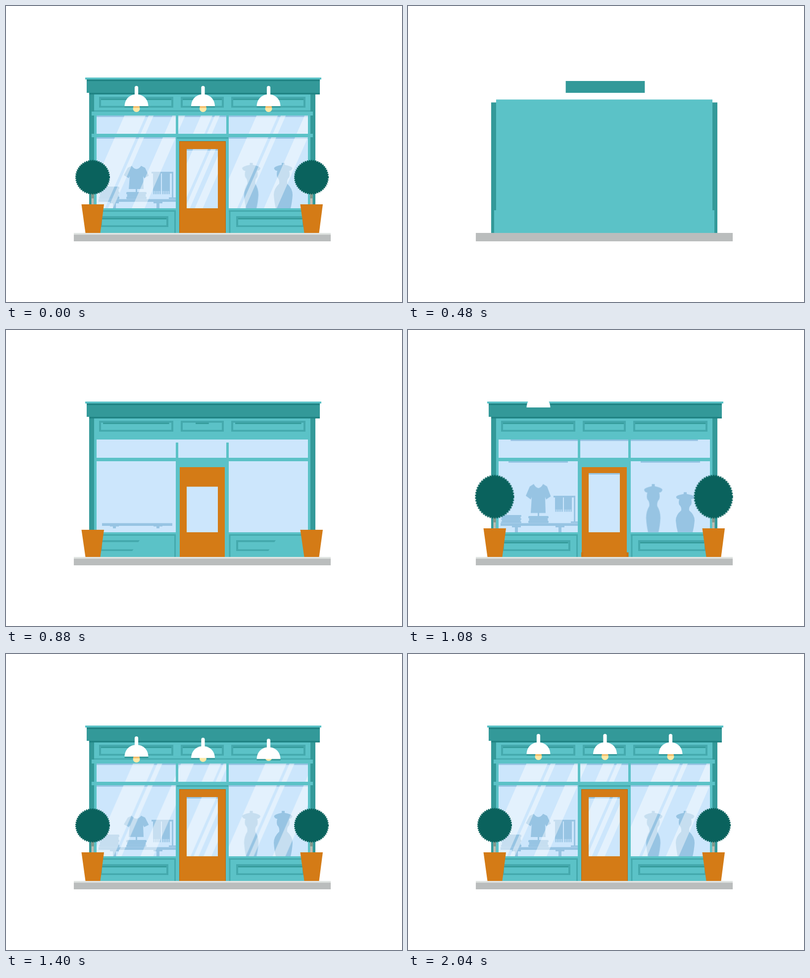
These frames come from a looping animation (800 px wide and 600 px high, 2920 ms). An HTML page:

```html
<!DOCTYPE html>
<html lang="en">
<head>
<meta charset="utf-8">
<title>Shop front</title>
<style>
html, body { margin: 0; width: 100%; height: 100%; overflow: hidden; background: #fff; }
svg { display: block; width: 100%; height: 100%; }
svg * { transform-box: fill-box; transform-origin: 50% 100%; }
@keyframes show { from { visibility: hidden; } }
@keyframes growX { from { transform: scaleX(0); } }
@keyframes growY { from { transform: scaleY(0); } }
@keyframes growBack {
  0% { transform: scaleY(0); }
  45% { transform: scaleY(1.2); }
  75% { transform: scaleY(.95); }
}
@keyframes pane {
  0% { transform: scaleY(0); }
  55% { transform: scaleY(1.11); }
}
@keyframes spring {
  0% { transform: scaleY(0); }
  15% { transform: scaleY(1.25); }
  32% { transform: scaleY(.87); }
  55% { transform: scaleY(.92); }
  78% { transform: scaleY(1.01); }
}
@keyframes bush {
  0% { transform: scale(0); }
  10% { transform: scale(1.2, 1); }
  15% { transform: scale(1.13, 1.265); }
  30% { transform: scale(.94, .95); }
  43% { transform: scale(1.03, 1.04); }
  55% { transform: scale(1, .985); }
  75% { transform: scale(1.01, 1); }
}
@keyframes wipe {
  from { clip-path: polygon(0 0, 0 0, -15px 100%, 0 100%); }
  to { clip-path: polygon(0 0, 170px 0, 155px 100%, 0 100%); }
}
@keyframes drop {
  0% { transform: translateY(-150px); }
  12.5% { transform: translateY(-46px); }
  25% { transform: translateY(2px); }
  35% { transform: translateY(12px); }
  45% { transform: translateY(9px); }
  50% { transform: translateY(6.5px); }
  55% { transform: translateY(3.5px); }
  70% { transform: translateY(-2.6px); }
  85% { transform: translateY(-1px); }
}
@keyframes tuck { from { transform: translateY(-13px); } }
@keyframes slide { from { transform: translateX(230px); } }
</style>
</head>
<body>
<svg id="stage" viewBox="0 0 800 600"></svg>
<script>
const LIGHT = '#5bc2c7', MID = '#44a9ad', TEAL = '#339999', DARK = '#1f8383',
      GLASS = '#cce6fc', BLUE = '#97c4e3', ORANGE = '#d47b16', LEAF = '#0a625d';
const OUT = 'cubic-bezier(.215,.61,.355,1)';

// Style attribute for one entrance animation
const anim = (name, start, dur, ease = 'linear', origin = '') =>
  ` style="animation:${name} ${dur}ms ${ease} ${start}ms both paused;${origin && 'transform-origin:' + origin}"`;
const path = (d, fill, a = '') => `<path d="${d}" fill="${fill}"${a}/>`;
const box = (x0, y0, x1, y1, fill, a = '', r = 0) =>
  `<rect x="${x0}" y="${y0}" width="${x1 - x0}" height="${y1 - y0}" rx="${r}" fill="${fill}"${a}/>`;
const group = (inner, a = '') => `<g${a}>${inner}</g>`;
const wide = (start, dur) => anim('growX', start, dur, OUT);

function panel(x0, y0, x1, y1, start) {
  const ring = `M${x0} ${y0}H${x1}V${y1}H${x0}ZM${x0 + 4} ${y0 + 4}V${y1 - 3.5}H${x1 - 4}V${y0 + 4}Z`;
  return box(x0 + 4, y0 + 3.5, x1 - 4, y0 + 6.5, TEAL, wide(start + 140, 160)) +
    path(ring, MID, anim('wipe', start, 170));
}

function pile(x, top, n, a) {
  const h = (391 - top) / n;
  let s = '';
  for (let i = 0; i < n; i++) {
    const dx = i % 2 ? 1.5 : 0;
    s += box(x + dx, top + i * h, x + 41 - dx, top + (i + 1) * h + .4, BLUE, '', 2);
  }
  return group(s, a);
}

function towel(x) {
  return box(x, 336, x + 16, 375, BLUE) +
    `<path d="M${x + .5} 378H${x + 16}" stroke="${BLUE}" stroke-width="7" stroke-dasharray="2 1.3"/>`;
}

function mannequin(x, hip, start) {
  const d = `M-3 318H3V322Q18 325 18.5 329Q17 334 12 334Q14 342 12 347Q7 352 8 360
    Q${hip} 370 ${hip} 383Q${hip - 1} 398 ${hip - 4} 410H${4 - hip}Q${1 - hip} 398 ${-hip} 383
    Q${-hip} 370 -8 360Q-7 352 -12 347Q-14 342 -12 334Q-17 334 -18.5 329Q-18 325 -3 322Z`;
  return `<g transform="translate(${x})">${path(d, BLUE, anim('growBack', start, 340, 'ease-out'))}</g>`;
}

// Slanted reflections; each band is [left, right] measured at height y
function glare(id, panes, y, bands) {
  const lean = .4375;
  const d = bands.map(([l, r]) => {
    const up = (y - 200) * lean, down = (420 - y) * lean;
    return `M${l + up} 200H${r + up}L${r - down} 420H${l - down}Z`;
  }).join('');
  return `<clipPath id="${id}">${panes.map(p => box(...p, '#000')).join('')}</clipPath>` +
    `<g clip-path="url(#${id})">${path(d, '#fff" fill-opacity=".45', anim('slide', 1120, 475, OUT))}</g>`;
}

function tree(x) {
  return box(x - 2.5, 376, x + 2.5, 403, '#bfbdb2', anim('growY', 900, 100)) +
    box(x - 2.5, 376, x + 2.5, 390, '#83968a', anim('growY', 940, 80)) +
    path(`M${x - 22.5} 402H${x + 23}L${x + 15.5} 460H${x - 14.5}Z`, ORANGE, anim('growBack', 820, 220, 'ease-out')) +
    group(`<circle cx="${x}" cy="347" r="33.6" fill="${LEAF}"/>
      <circle cx="${x}" cy="347" r="34" fill="none" stroke="${LEAF}" stroke-width="2" stroke-dasharray="2.6 1.7"/>`,
      anim('bush', 960, 800));
}

function lamp(x, i) {
  const late = i * 40;
  const bulb = `<circle cx="${x}" cy="208" r="7" fill="#fce9a6"/>` +
    path(`M${x - 6} 203H${x + 6}L${x + 6.8} 206.5H${x - 6.8}Z`, '#f3bd6c');
  return group(
    box(x - 24, 203, x + 24, 206, TEAL, anim('show', 1240 + late, 1)) +
    group(group(bulb, anim('tuck', 1270 + late, 130)), anim('show', 1200 + late, 1)) +
    box(x - 3.6, 162, x + 3.6, 190, '#fff', '', 3.5) +
    path(`M${x - 24} 203C${x - 23} 171 ${x + 23} 171 ${x + 24} 203Z`, '#fff'),
    anim('drop', 980 + late, 800));
}

const rise = anim('growY', 280, 280, 'cubic-bezier(.3,.32,.3,1)');
const pillar = anim('growY', 287, 290, 'cubic-bezier(.3,.32,.3,1)');
const art = [
  box(137, 460, 656, 477, '#babdbd', anim('show', 300, 1)),
  box(137, 460, 656, 463.5, '#e0e4e2', anim('growX', 500, 240, 'ease-in-out')),
  // walls
  box(168, 176, 178, 460, TEAL, pillar),
  box(615, 176, 625, 460, TEAL, pillar),
  box(178, 176, 615, 460, LIGHT, rise),
  ...[[174, 343], [448, 619]].map(([l, r]) => box(l, 414, r, 460, LIGHT, anim('growY', 280, 40))),
  box(171, 410, 343, 414, LIGHT, wide(520, 120)),
  box(450, 410, 622, 414, LIGHT, wide(520, 120)),
  box(174, 414, 343, 417, MID, wide(760, 160)),
  box(450, 414, 619, 417, MID, wide(760, 160)),
  box(340, 414, 343, 460, MID, anim('growBack', 560, 266, 'ease-out')),
  box(450.5, 414, 453.5, 460, MID, anim('growBack', 560, 266, 'ease-out')),
  panel(190, 426, 328, 448, 800),
  panel(465, 426, 603, 448, 800),
  // roof
  box(163, 152, 634, 176, TEAL, wide(460, 160)),
  box(160, 145, 637, 149, LIGHT, wide(540, 130)),
  box(163, 148.8, 634, 152.2, DARK, anim('growX', 620, 122)),
  box(168, 176, 634, 179.3, DARK, anim('growX', 676, 150)),
  panel(188, 184, 338, 206, 640),
  panel(353, 184, 440, 206, 720),
  panel(455, 184, 605, 206, 640),
  // glass
  box(183, 222, 610, 259, GLASS, anim('pane', 570, 200, 'ease-out', '50% 50%')),
  box(183, 266, 343, 410, GLASS, anim('growY', 700, 180, OUT)),
  box(450, 266, 610, 410, GLASS, anim('growY', 700, 180, OUT)),
  box(183, 222, 610, 225, BLUE, anim('growX', 940, 158)),
  box(183, 266, 343, 269, BLUE, anim('growX', 960, 160)),
  box(450, 266, 610, 269, BLUE, anim('growX', 960, 160)),
  box(343, 222, 348, 259, LIGHT, anim('growY', 780, 120)),
  box(445, 222, 450, 259, LIGHT, anim('growY', 780, 120)),
  // door
  box(345, 266, 449, 269, MID, wide(1200, 140)),
  box(351, 278, 442, 460, ORANGE, anim('growBack', 540, 266, 'ease-out')),
  group(box(350, 274, 444, 460, '#b9660f') + box(351, 275, 443, 460, ORANGE),
    anim('growY', 1050, 190, 'ease-in-out')),
  box(365, 290, 428, 410, GLASS, anim('growY', 820, 160, OUT)),
  box(365, 290, 428, 293, BLUE, wide(940, 120)),
  // display on the left
  box(187, 391.5, 343, 397, BLUE, wide(800, 140)),
  ...[219, 307].map(x => path(`M${x - 9} 397H${x + 9}V400H${x + 3}V410H${x - 3}V400H${x - 9}Z`, BLUE,
    anim('growY', 840, 100, 'linear', '50% 0'))),
  pile(188, 366, 5, anim('growY', 1000, 125)),
  pile(243, 377, 3, anim('growY', 900, 120)),
  box(262, 370, 265, 378, BLUE, anim('growY', 960, 60)),
  path('M254 324Q263.5 337 273 324L281 328L288.5 344L279 349L277 345L278 371H248L250 345L248 349L238 343L246 328Z',
    BLUE, anim('spring', 960, 800)),
  path('M294 336H338V388H343V391H329V388H335V339.5H294Z', BLUE, anim('growY', 900, 120)),
  group(towel(297) + towel(315), anim('growY', 980, 140, 'linear', '50% 0')),
  // display on the right
  mannequin(495.5, 14.5, 970),
  mannequin(560, 19, 996),
  glare('paneL', [[183, 222, 343, 259], [183, 266, 343, 410]], 266, [[220, 263], [269, 279], [317, 343]]),
  glare('paneC', [[348, 222, 445, 259]], 222, [[336, 362], [394, 417], [422, 432]]),
  glare('paneR', [[450, 222, 610, 259], [450, 266, 610, 410]], 266, [[487, 530], [536, 546], [584, 610]]),
  glare('paneD', [[365, 290, 428, 410]], 290, [[378, 408], [414, 424], [434, 450]]),
  // ledges
  box(178, 211.5, 615, 214, MID, wide(1140, 160)),
  box(173, 214, 620, 222, LIGHT, wide(1100, 180)),
  box(173, 259, 620, 266, LIGHT, wide(1100, 180)),
  tree(175),
  tree(617),
  ...[263.5, 398, 530.5].map(lamp)
];
document.getElementById('stage').innerHTML = art.join('');

// Seek every animation to the loop time, held at 25 pictures per second
const LOOP = 2920, STEP = 40;
const parts = document.getAnimations();
const begin = performance.now();
function draw(now) {
  const t = Math.floor((Math.max(0, now - begin) % LOOP) / STEP) * STEP;
  for (const p of parts) p.currentTime = t < 80 ? LOOP : t;
}
function tick() {
  draw(performance.now());
  requestAnimationFrame(tick);
}
tick();
</script>
</body>
</html>
```
